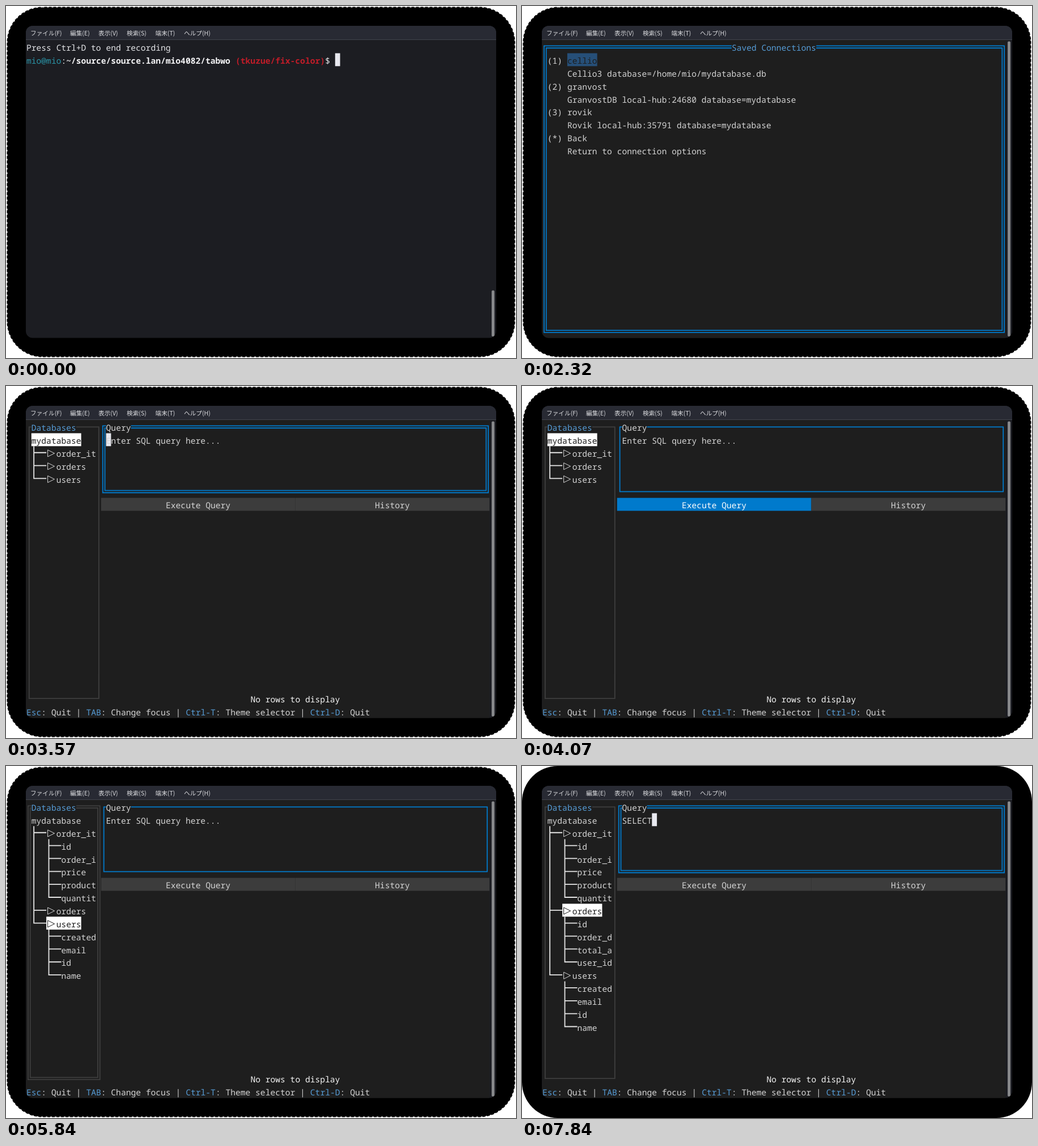
Animation of 900 by 622 pixels, one loop 8000 ms. Source, as an HTML page:

```html
<!DOCTYPE html>
<html lang="ja">
<head>
<meta charset="utf-8">
<title>Terminal session</title>
<style>
  html, body { margin: 0; width: 100%; height: 100%; overflow: hidden; background: #fff; }
  svg { display: block; width: 100vw; height: 100vh; }
  text { white-space: pre; }
  .mono { font: 14.645px "Noto Sans Mono", "DejaVu Sans Mono", monospace; text-rendering: geometricPrecision; }
  .menu { font: 10.67px "Noto Sans CJK JP", "Noto Sans", sans-serif; fill: #dcdde0; }
</style>
</head>
<body>
<svg viewBox="0 0 900 622">
  <defs><clipPath id="win"><rect x="35" y="35" width="830" height="551.5" rx="12"/></clipPath></defs>
  <g id="card"></g>
  <g clip-path="url(#win)">
    <rect x="35" y="35" width="830" height="552" fill="#1c1d22"/>
    <rect x="35" y="35" width="830" height="24" fill="#282a33"/>
    <rect x="35" y="59" width="830" height="1" fill="#41444c"/>
    <g class="menu" id="menu"></g>
    <g class="mono" id="screen"></g>
    <rect id="bar" x="857" width="5" rx="2" fill="#86878a"/>
  </g>
</svg>
<script>
const LOOP = 8000, W = 8.787, H = 22.85, X0 = 36, Y0 = 60.6;
const BG = '#1e1e1e', FG = '#d4d4d4', BLUE = '#007acc', SKY = '#569cd6', GRAY = '#3e3e3e', WHITE = '#ffffff';
const $ = id => document.getElementById(id);
const cx = c => X0 + c * W;
const ry = r => Y0 + r * H;

const rect = (x, y, w, h, fill) => `<rect x="${x}" y="${y}" width="${w}" height="${h}" fill="${fill}"/>`;
const cells = (c, r, n, fill) => rect(cx(c), ry(r), n * W, H, fill);
const text = (c, r, s, fill = FG, bold = false) =>
  `<text x="${cx(c)}" y="${ry(r) + 18.6}" fill="${fill}"${bold ? ' font-weight="700"' : ''}>${s}</text>`;
const path = (d, color, width = 1.8) => `<path d="${d}" fill="none" stroke="${color}" stroke-width="${width}"/>`;
const cursor = (c, r) => cells(c, r, 1, '#e8e9f0');

// Runs of [string, colour, bold] laid out one after another.
function runs(c, r, parts) {
  return parts.map(([s, fill, bold]) => {
    const out = text(c, r, s, fill, bold);
    c += s.length;
    return out;
  }).join('');
}

// Cell border from (c0, r0) to (c1, r1), broken at the title.
function frame(c0, r0, c1, r1, color, double, title, titleCol, titleColor) {
  const x0 = cx(c0 + .55), x1 = cx(c1 + .55), y0 = ry(r0 + .515), y1 = ry(r1 + .515);
  const a = cx(titleCol), b = cx(titleCol + title.length);
  return (double ? [-1.9, 1.9] : [0]).map(d =>
    path(`M${a} ${y0 + d}H${x0 + d}V${y1 - d}H${x1 - d}V${y0 + d}H${b}`, color)).join('')
    + text(titleCol, r0, title, titleColor);
}

function shell({ typed = '', caret = true }) {
  return text(0, 0, 'Press Ctrl+D to end recording', '#e4e5e8')
    + runs(0, 1, [
      ['mio@mio', '#2a95a8'], [':', '#f0f0f2'],
      ['~/source/source.lan/mio4082/tabwo', '#f2f2f4', true], [' ', FG],
      ['(tkuzue/fix-color)', '#c01c28', true], ['$ ' + typed, '#e4e5e8']
    ])
    + (caret ? cursor(62 + typed.length, 1) : '');
}

const links = [
  ['(1)', 'cellio', 'Cellio3 database=/home/mio/mydatabase.db'],
  ['(2)', 'granvost', 'GranvostDB local-hub:24680 database=mydatabase'],
  ['(3)', 'rovik', 'Rovik local-hub:35791 database=mydatabase'],
  ['(*)', 'Back', 'Return to connection options']
];

const backdrop = () => rect(35.5, 60, cx(93) - 35.5, 527, BG);

function saved({ pick }) {
  return backdrop() + frame(0, 0, 92, 22, BLUE, true, 'Saved Connections', 38, SKY)
    + links.map(([key, name, info], i) => {
      const r = 1 + 2 * i, on = i === pick;
      return text(1, r, key) + (on ? cells(5, r, name.length, '#264f78') : '')
        + text(5, r, name, on ? BG : FG) + text(5, r + 1, info);
    }).join('');
}

const tables = {
  order_items: ['id', 'order_id', 'price', 'product_id', 'quantity'],
  orders: ['id', 'order_date', 'total_amount', 'user_id'],
  users: ['created_at', 'email', 'id', 'name']
};

// Vertical stem with one branch per listed row.
function stem(c, rows, from) {
  const x = cx(c + .5), last = rows[rows.length - 1];
  return path(`M${x} ${ry(from)}V${ry(last + .5)}`
    + rows.map(r => `M${x - .9} ${ry(r + .5)}H${cx(c + 3)}`).join(''), '#e6e6e6');
}

function tree(open, pick) {
  const top = pick === 'mydatabase';
  let out = (top ? cells(1, 1, 10, WHITE) : '') + text(1, 1, 'mydatabase', top ? BG : FG);
  const heads = [];
  let r = 2;
  for (const [name, fields] of Object.entries(tables)) {
    const label = name.slice(0, 8), on = name === pick, ink = on ? BG : FG, y = ry(r + .5) + 1;
    heads.push(r);
    if (on) out += cells(4, r, label.length + 2, WHITE);
    out += path(`M73.6 ${y - 5.8}V${y + 6.2}L85.6 ${y + .2}Z`, ink, 1) + text(6, r++, label, ink);
    if (!open.includes(name)) continue;
    const first = r;
    for (const f of fields) {
      const s = f.slice(0, 7), lit = pick === name + '.' + f;
      if (lit) out += cells(7, r, s.length, WHITE);
      out += text(7, r++, s, lit ? BG : FG);
    }
    out += stem(4, fields.map((_, i) => first + i), first);
  }
  return out + stem(1, heads, 2);
}

function button(c, label, labelCol, on) {
  return cells(c, 6, 39, on ? BLUE : '#3c3c3c') + text(labelCol, 6, label, on ? WHITE : FG);
}

function main({ focus, open = [], pick = 'mydatabase', query = '' }) {
  const editing = focus === 'query';
  return backdrop()
    + frame(0, 0, 14, 21, GRAY, focus === 'tree', 'Databases', 1, SKY)
    + tree(open, pick)
    + frame(15, 0, 92, 5, BLUE, editing, 'Query', 16, FG)
    + (editing ? cursor(16 + query.length, 1) : '')
    + text(16, 1, query || 'Enter SQL query here...')
    + button(15, 'Execute Query', 28, focus === 'run')
    + button(54, 'History', 70, focus === 'history')
    + text(45, 21, 'No rows to display', '#f4f4f4')
    + runs(0, 22, [
      ['Esc', SKY], [': Quit | ', FG], ['TAB', SKY], [': Change focus | ', FG],
      ['Ctrl-T', SKY], [': Theme selector | ', FG], ['Ctrl-D', SKY], [': Quit', FG]
    ]);
}

const one = ['order_items'], two = [...one, 'users'], all = [...two, 'orders'];
const type = query => ({ focus: 'query', open: all, pick: 'orders', query });
const steps = [
  [0, shell, {}],
  [250, shell, { caret: false }],
  [520, shell, { typed: '.' }],
  [770, shell, { typed: './' }],
  [1030, shell, { typed: './t' }],
  [1290, shell, { typed: './ta' }],
  [1550, shell, { typed: './tabwo ' }],
  [1810, shell, { typed: './tabwo', caret: false }],
  [2320, saved, { pick: 0 }],
  [2820, saved, { pick: 1 }],
  [3070, saved, { pick: 2 }],
  [3570, main, { focus: 'query' }],
  [4070, main, { focus: 'run' }],
  [4320, main, { focus: 'history' }],
  [4580, main, { focus: 'tree' }],
  [4830, main, { focus: 'tree', pick: 'order_items' }],
  [5080, main, { focus: 'tree', open: one, pick: 'order_items' }],
  [5330, main, { focus: 'tree', open: one, pick: 'order_items.price' }],
  [5580, main, { focus: 'tree', open: one, pick: 'users' }],
  [5840, main, { focus: 'tree', open: two, pick: 'users' }],
  [6090, main, { focus: 'tree', open: two, pick: 'orders' }],
  [6340, main, { focus: 'tree', open: all, pick: 'orders' }],
  [6590, main, type('')],
  [6840, main, type('S')],
  [7090, main, type('SE')],
  [7340, main, type('SEL')],
  [7590, main, type('SELE')],
  [7840, main, type('SELECT')]
];

const card = smooth => smooth
  ? '<rect width="900" height="622" rx="63"/>'
  : '<rect x="1.5" y="1.5" width="897" height="619" rx="63"/>'
    + '<rect x="1.5" y="1.5" width="897" height="619" rx="63" fill="none" stroke="#fff" stroke-width="2" stroke-dasharray="3 5"/>';

$('menu').innerHTML = [[43, 'ファイル(F)'], [113, '編集(E)'], [163, '表示(V)'],
  [213, '検索(S)'], [263.5, '端末(T)'], [314, 'ヘルプ(H)']]
  .map(([x, s]) => `<text x="${x}" y="51.8">${s}</text>`).join('');

let shown = -1;
function render(t) {
  let i = steps.length - 1;
  while (steps[i][0] > t) i--;
  if (i === shown) return;
  shown = i;
  const [at, draw, state] = steps[i];
  const y = draw === shell ? 502.5 : 62.5;
  $('screen').innerHTML = draw(state);
  $('card').innerHTML = card(at >= 7340);
  $('bar').setAttribute('y', y);
  $('bar').setAttribute('height', 584 - y);
}

const start = performance.now();
function tick() {
  render((performance.now() - start) % LOOP);
  requestAnimationFrame(tick);
}
tick();
</script>
</body>
</html>
```
